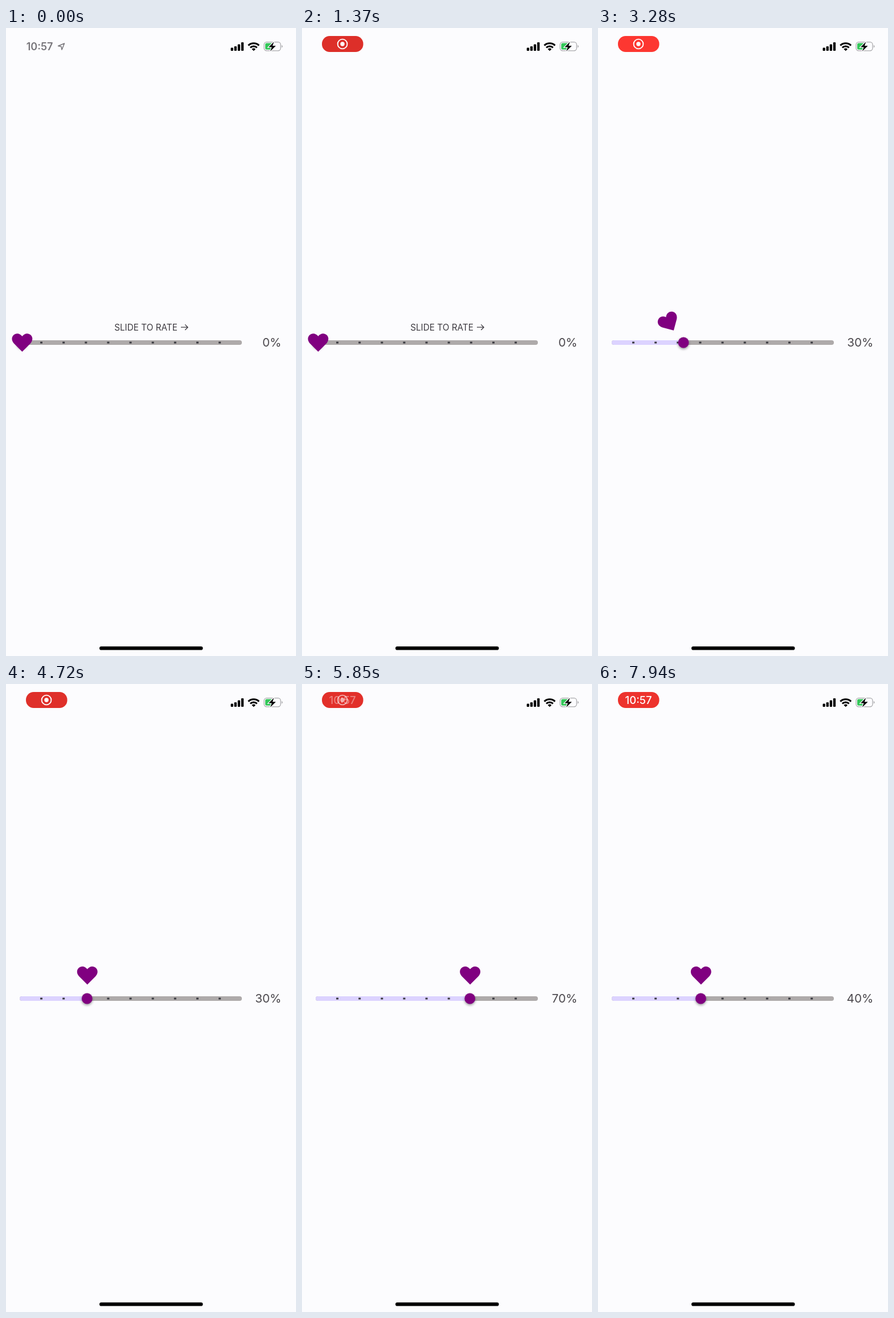
An HTML page that plays this animation: 509 by 1100 pixels, repeating every 7.99 s.

```html
<!DOCTYPE html>
<html lang="en">
<meta charset="utf-8">
<title>Slide to rate</title>
<style>
html, body { margin: 0; width: 100%; height: 100%; overflow: hidden; background: #fcfcfe; }
svg { display: block; width: 509px; height: 1100px; font-family: Inter, Roboto, sans-serif; }
#thumb { filter: drop-shadow(0 2.5px 2px rgba(0, 0, 0, .4)); }
</style>
<svg viewBox="0 0 509 1100">
  <g id="clock">
    <text x="59" y="39" font-size="18" font-weight="600" fill="#77757a" text-anchor="middle">10:57</text>
    <path d="M91.5 31.5 102.5 27 98 38 97 32.5Z" fill="none" stroke="#77757a" stroke-width="1.5" stroke-linejoin="round"/>
  </g>

  <g id="recording">
    <rect id="pill" x="35" y="14" width="72.5" height="28" rx="13.5"/>
    <g id="dot" fill="#fff">
      <circle cx="71" cy="28" r="8.4" fill="none" stroke="#fff" stroke-width="1.9"/>
      <circle cx="71" cy="28" r="3.7"/>
    </g>
    <text id="pillTime" x="71" y="34.7" font-size="18.5" font-weight="500" fill="#fff" text-anchor="middle">10:57</text>
  </g>

  <g id="bars">
    <rect x="394.5" y="34.5" width="4.3" height="5.5" rx="1.2"/>
    <rect x="400.6" y="32" width="4.3" height="8" rx="1.2"/>
    <rect x="406.7" y="28.5" width="4.3" height="11.5" rx="1.2"/>
    <rect x="412.8" y="25" width="4.3" height="15" rx="1.2"/>
  </g>
  <g id="wifi" fill="none" stroke="#000" stroke-width="3">
    <path d="M425.3 30.6a13.6 13.6 0 0 1 18.8 0M428.8 34.4a8.6 8.6 0 0 1 11.8 0"/>
    <path d="M434.7 40.2l-3.3-3.3a4.7 4.7 0 0 1 6.6 0Z" fill="#000" stroke="none"/>
  </g>
  <g id="battery">
    <rect x="453" y="24.6" width="29" height="15.2" rx="4.5" fill="none" stroke="#a9a9ac" stroke-width="1.3"/>
    <path d="M483.8 29.8q1.7.6 1.7 2.4t-1.7 2.4Z" fill="#a9a9ac"/>
    <path d="M457.5 26.6H467V37.8H457.5a2.5 2.5 0 0 1-2.5-2.5V29.1a2.5 2.5 0 0 1 2.5-2.5Z" fill="#34c759"/>
    <path d="M470.3 24.2 461 33.6h5.5L463.8 40.8 473.6 31.2h-5.8Z" stroke="#fcfcfe" stroke-width="2.4" paint-order="stroke"/>
  </g>

  <g id="label" fill="#3d3a40">
    <text x="245.5" y="529.7" font-size="15.3" text-anchor="middle">SLIDE TO RATE</text>
    <path d="M307 524.2h12M314.3 519.4l4.8 4.8-4.8 4.8" fill="none" stroke="#3d3a40" stroke-width="1.3"/>
  </g>
  <rect x="24" y="547" width="390" height="8" rx="4" fill="#aeaaaa"/>
  <path id="active" fill="#dcd3ff"/>
  <path d="M60 551H380" stroke="#3a3a40" stroke-width="2.8" stroke-dasharray="4 35.14"/>
  <circle id="thumb" cy="551" r="9.4" fill="#800080"/>
  <path id="heart" fill="#800080" d="M0 16-14.5 1.5C-19-3.5-19-9.5-15-13.2-11-17-4.5-17 0-11 4.5-17 11-17 15-13.2 19-9.5 19-3.5 14.5 1.5Z"/>
  <text id="percent" x="483.3" y="557.8" font-size="20.7" fill="#4a474c" text-anchor="end"></text>

  <rect x="164" y="1083.3" width="181.5" height="6.2" rx="3.1"/>
</svg>
<script>
const LOOP = 7990, START = 28, STEP = 38.1, DRAG = 2100;
const $ = id => document.getElementById(id);
const clamp = (v, lo, hi) => Math.min(hi, Math.max(lo, v));
const ramp = (t, from, to) => {
  const p = clamp((t - from) / (to - from), 0, 1);
  return p * p * (3 - 2 * p);
};

// Thumb position while dragging: [time, x]
const drag = [
  [0, START], [DRAG, START], [2600, 86], [3000, 135], [3280, 150], [3420, 158],
  [3850, 198], [4200, 178], [4500, 142.3], [5050, 142.3], [5250, 185], [5500, 270],
  [5640, 294.7], [6700, 294.7], [6900, 262], [7130, 202], [7270, 180.4], [LOOP, 180.4]
];
function thumbX(t) {
  const i = Math.max(1, drag.findIndex(([time]) => time >= t));
  const [t0, x0] = drag[i - 1], [t1, x1] = drag[i];
  return x0 + (x1 - x0) * clamp((t - t0) / (t1 - t0), 0, 1);
}

function draw(t) {
  const x = thumbX(t);
  $('thumb').setAttribute('cx', x);
  $('active').setAttribute('d', `M${x} 547H28a4 4 0 0 0 0 8H${x}Z`);
  $('percent').textContent = Math.floor((x - START) / STEP + .02) * 10 + '%';
  $('label').style.display = t < DRAG ? '' : 'none';

  // The heart trails the thumb and swings around it against the motion
  const lift = 40.5 * ramp(t, DRAG, DRAG + 260);
  const tilt = clamp((thumbX(t - 200) - x) * 3, -30, 30);
  $('heart').setAttribute('transform',
    `translate(${thumbX(t - 100) + .4} 551) rotate(${tilt}) translate(0 ${-lift})`);

  const shown = ramp(t, 300, 650);
  $('clock').style.opacity = 1 - shown;
  $('recording').style.opacity = shown;
  const glow = (.5 - .5 * Math.cos((t - 1350) / 3850 * 2 * Math.PI)) ** 1.4;
  $('pill').setAttribute('fill', `rgb(${221 + 32 * glow}, ${47 + 8 * glow}, ${41 + 8 * glow})`);
  const swap = ramp(t, 5680, 6080);
  $('dot').style.opacity = 1 - swap;
  $('pillTime').style.opacity = swap;
}

const begin = performance.now();
function tick() {
  draw((performance.now() - begin) % LOOP);
  requestAnimationFrame(tick);
}
tick();
</script>
</html>
```
